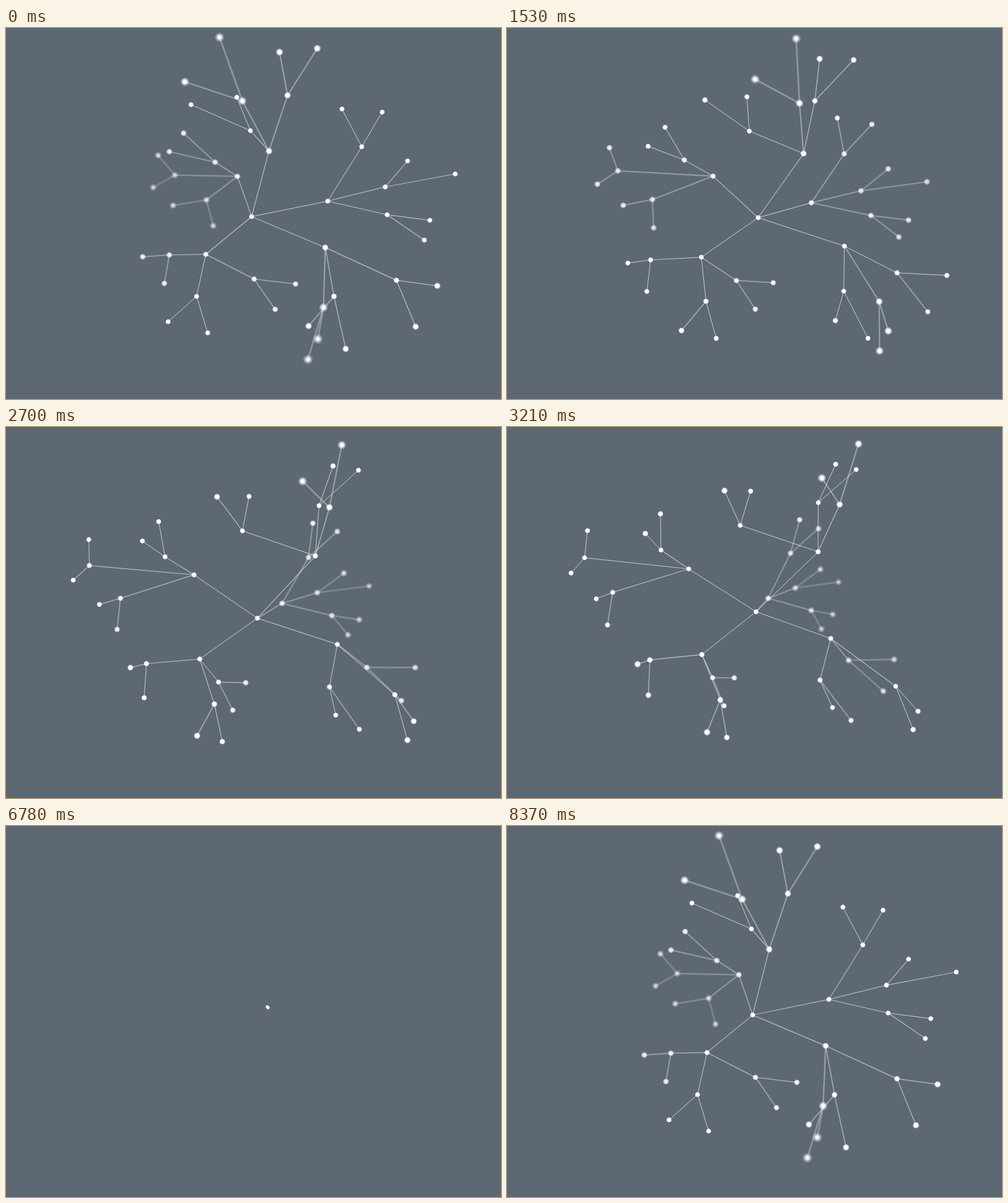
An HTML page with a canvas for the animation above (8400 ms loop, 800 by 600 pixels).

```html
<!DOCTYPE html>
<html lang="en">
<head>
<meta charset="utf-8">
<title>Seed and tree</title>
<style>
  html, body { margin: 0; width: 100%; height: 100%; overflow: hidden; background: #5d6873; }
  canvas { display: block; }
</style>
</head>
<body>
<canvas id="stage" width="800" height="600"></canvas>
<script>
const ctx = document.getElementById('stage').getContext('2d');
const LOOP = 8400, TAU = Math.PI * 2;
const CX = 397, CY = 300, DEPTH = 900;
const TURN = 3210;

const { sin, cos, abs, sqrt, min, max } = Math;
const clamp = (v, a = 0, b = 1) => min(b, max(a, v));
const backIn = (p, c) => p * p * ((c + 1) * p - c);
const white = a => `rgba(255,255,255,${a})`;

// Joint x, y, z; then three twigs: x, y, z and the x, y of two tips
const tree = [
  limb(520, 280, -42,
    [575, 192, -32, 543, 131, 608, 136],
    [613, 257, -45, 649, 215, 726, 236],
    [616, 302, -17, 685, 311, 676, 343]),
  limb(425, 199, 106,
    [455, 109, 89, 442, 39, 503, 33],
    [382, 118, 171, 345, 15, 289, 87],
    [395, 166, -22, 373, 112, 299, 124]),
  limb(374, 240, -106,
    [338, 217, -137, 287, 170, 264, 200],
    [273, 238, -242, 246, 206, 238, 258],
    [324, 278, -219, 270, 287, 335, 320]),
  limb(323, 366, -52,
    [264, 367, -115, 221, 370, 256, 413],
    [308, 434, -9, 262, 475, 326, 493],
    [401, 406, -77, 468, 414, 435, 455]),
  limb(516, 355, 77,
    [513, 452, 200, 504, 503, 488, 536],
    [530, 434, 49, 489, 482, 549, 519],
    [631, 408, 44, 697, 417, 662, 483])
].flat();

function limb(x, y, z, ...twigs) {
  const joint = { x, y, z };
  const nodes = [joint];
  for (const [mx, my, mz, ax, ay, bx, by] of twigs) {
    const mid = { x: mx, y: my, z: mz, parent: joint };
    // Tips lean forward: with their rise above the centre, with the joint below it
    const tip = (tx, ty) => ({
      x: tx, y: ty, parent: mid,
      z: mz + (y < CY ? 5 + (my - ty) / 2 : 20 + 0.35 * z)
    });
    nodes.push(mid, tip(ax, ay), tip(bx, by));
  }
  return nodes;
}

// Falling seed: time, x, y
const fall = [
  [3735, 391, -4], [4500, 274, 121], [5460, 287, 175], [5900, 380, 249],
  [6480, 482, 204], [6780, 423, 293], [7230, 399, 316]
];

const bob = time => sin(TAU * time / 2900);

function place(node, root, time, grown) {
  const angle = Math.PI / 3 * time / TURN;
  const dx = node.x - CX;
  const z = node.z * cos(angle) - dx * sin(angle);
  const scale = (DEPTH + z) / (DEPTH + node.z);
  const x = CX + dx * cos(angle) + node.z * sin(angle) + 7 * sin(Math.PI * time / TURN);
  const y = CY + (node.y - CY) * scale - 8 * bob(time);
  return {
    x: root.x + (x - root.x) * grown,
    y: root.y + (y - root.y) * grown,
    z: z * grown
  };
}

function size(time) {
  return time < 0
    ? 1 - backIn(1 - clamp((time + 800) / 700), 1.1)
    : 1 - backIn(clamp((time - 3220) / 320), 1.4);
}

function line(p, q) {
  const z = (p.z + q.z) / 2;
  const blur = clamp((abs(z) - 20) / 230);
  const far = z < 0 ? 1 - 0.35 * blur : 1;
  const stroke = (width, alpha) => {
    ctx.lineWidth = width;
    ctx.strokeStyle = white(alpha * far);
    ctx.beginPath();
    ctx.moveTo(p.x, p.y);
    ctx.lineTo(q.x, q.y);
    ctx.stroke();
  };
  stroke(1 + 2.6 * blur, 0.68 - 0.52 * sqrt(blur));
  if (blur > 0) stroke(1 + blur, 0.14 * sqrt(blur));
}

function dot(p, k) {
  const blur = clamp((abs(p.z) - 20) / 250);
  const far = p.z < 0 ? 1 - 0.3 * blur : 1;
  const r = (4.4 + 3.2 * blur) * (1 + p.z / 1600) * k;
  if (r < 0.1) return;
  const glow = ctx.createRadialGradient(p.x, p.y, 0, p.x, p.y, r);
  glow.addColorStop(0, white(far));
  glow.addColorStop(0.68 - 0.4 * blur, white(far * (1 - 0.1 * blur)));
  glow.addColorStop(0.78 - 0.22 * blur, white(far * (0.82 - 0.42 * blur)));
  glow.addColorStop(1, white(0));
  ctx.fillStyle = glow;
  ctx.beginPath();
  ctx.arc(p.x, p.y, r, 0, TAU);
  ctx.fill();
}

function drawTree(time) {
  const root = {
    x: CX + 5.5 * (1 - cos(TAU * time / 4300)),
    y: 305 - 10 * bob(time),
    z: 0
  };
  const grown = size(time);
  if (grown > 0.002) {
    const spots = new Map();
    for (const node of tree) {
      const p = place(node, root, time, grown);
      spots.set(node, p);
      line(spots.get(node.parent) || root, p);
    }
    [...spots.values()].sort((a, b) => a.z - b.z)
      .forEach(p => dot(p, clamp(grown * 1.5)));
  }
  dot(root, clamp((3600 - time) / 60));
}

// Smooth curve through unevenly timed points
function along(keys, time) {
  const at = n => keys[clamp(n, 0, keys.length - 1)];
  const i = max(0, keys.findLastIndex((k, n) => k[0] <= time && n < keys.length - 1));
  const k = at(i), n = at(i + 1), span = n[0] - k[0];
  const u = clamp((time - k[0]) / span), v = 1 - u;
  const slope = (m, c) => (at(m + 1)[c] - at(m - 1)[c]) / (at(m + 1)[0] - at(m - 1)[0]);
  const axis = c =>
    k[c] * (1 + 2 * u) * v * v + n[c] * u * u * (1 + 2 * v) +
    span * u * v * (slope(i, c) * v - slope(i + 1, c) * u);
  return { x: axis(1), y: axis(2) };
}

function drawSeed(time) {
  const { x, y } = along(fall, time);
  const flat = time > 6950 ? 1 : abs(sin(TAU * (time - 4500) / 1900));
  const tilt = -0.6 * clamp((time - 4500) / 1500);
  ctx.fillStyle = white(0.95);
  ctx.beginPath();
  ctx.ellipse(x, y, max(0.5, 2.9 * flat), 3.4, tilt, 0, TAU);
  ctx.fill();
}

function draw(time) {
  ctx.fillStyle = '#5d6873';
  ctx.fillRect(0, 0, 800, 600);
  if (time < 3600) drawTree(time);
  else if (time >= 7600) drawTree(time - LOOP);
  else if (time >= 3735) drawSeed(time);
}

const start = performance.now();
function tick() {
  draw((performance.now() - start) % LOOP);
  requestAnimationFrame(tick);
}
tick();
</script>
</body>
</html>
```
